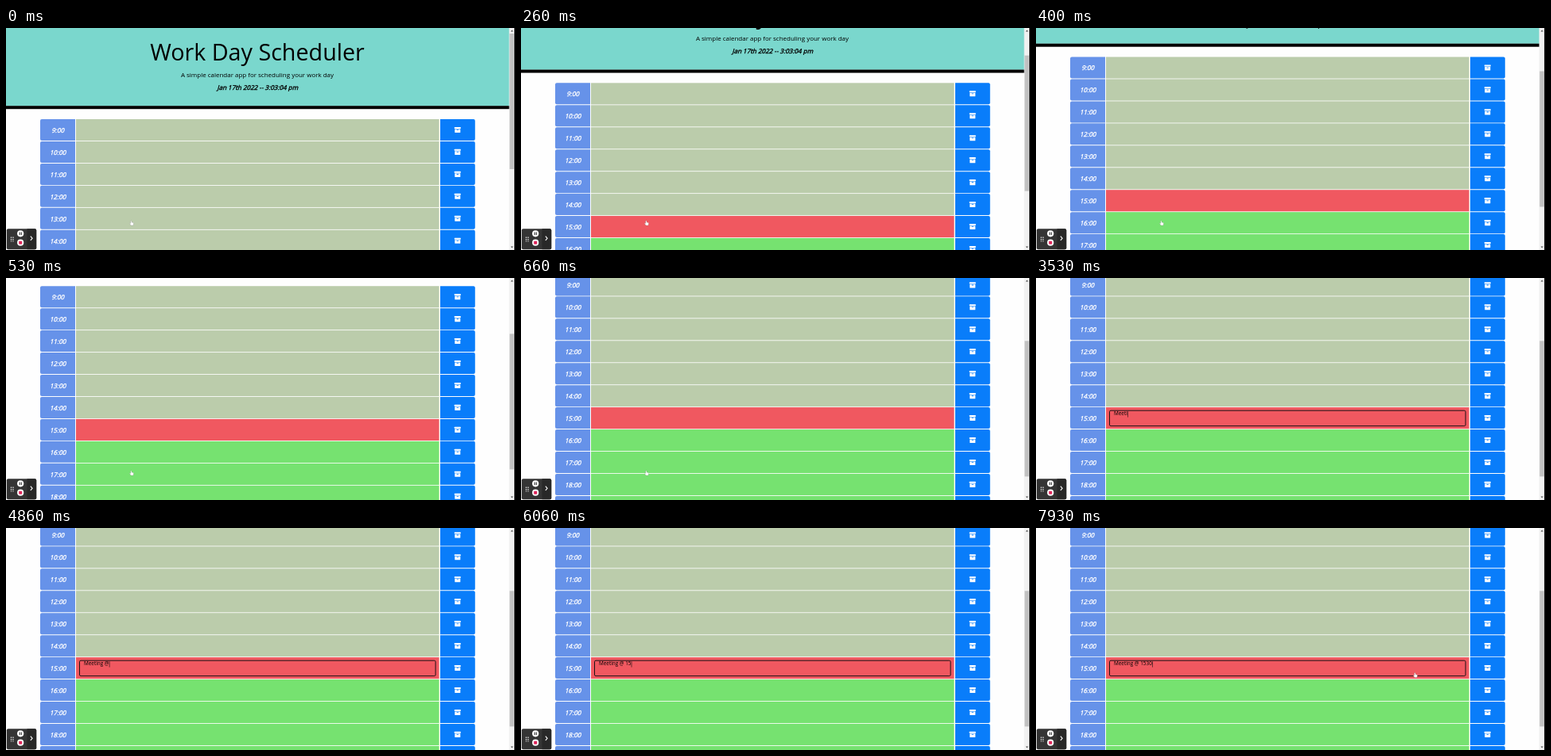
An HTML page for the animation above (8 s loop, 640 px wide and 280 px high).

```html
<!DOCTYPE html>
<html lang="en">
<head>
<meta charset="utf-8">
<title>Work Day Scheduler</title>
<style>
html, body { margin: 0; width: 100%; height: 100%; overflow: hidden; background: #fff; }
svg { display: block; width: 100vw; height: 100vh; font-family: "Open Sans", sans-serif; }
text { white-space: pre; }
.mid { text-anchor: middle; }
.slant { font-size: 8px; text-anchor: middle; stroke-width: .35px; }
</style>
</head>
<body>
<svg viewBox="0 0 640 280">
  <defs>
    <g id="archive" fill="#fff">
      <rect x="-4" y="-3.6" width="8" height="2" rx=".4"/>
      <path d="M-3.5-1.1h7v4.1q0 .5-.5.5h-6q-.5 0-.5-.5zM-1.2-.3v.8h2.4v-.8z" fill-rule="evenodd"/>
    </g>
  </defs>
  <rect width="640" height="280" fill="#fefefe"/>
  <g id="page">
    <rect width="633" height="98.3" fill="#7ad7cd"/>
    <rect y="98.2" width="633" height="4" fill="#000"/>
    <text class="mid" x="316" y="41" font-size="28.7">Work Day Scheduler</text>
    <text class="mid" x="316" y="61.6" font-size="7.97">A simple calendar app for scheduling your work day</text>
    <text class="slant" transform="translate(316.3 77.8) skewX(-14)" stroke="#000">Jan 17th 2022 -- 3:03:04 pm</text>
    <g id="rows"></g>
    <g id="field">
      <rect x="92.5" y="286.8" width="447.6" height="19.4" rx="1.5" fill="none" stroke="#1c1214"/>
      <text id="entry" x="98" y="292.9" font-size="6.38"></text>
      <rect id="caret" y="287.8" width=".6" height="7.4" fill="#111"/>
    </g>
  </g>
  <rect x="632.6" width="7.4" height="280" fill="#f1f1f1"/>
  <path d="M634.6 4.4l1.6-2 1.6 2zM634.6 275.6l1.6 2 1.6-2z" fill="#505050"/>
  <rect id="thumb" x="633.3" width="5.4" height="171" fill="#c1c1c1"/>
  <rect x="639" width="1" height="280" fill="#222"/>

  <g id="recorder">
    <rect x=".8" y="253.2" width="37.4" height="26" rx="2" fill="#343434"/>
    <path d="M26.5 253.2h9.7q2 0 2 2v22q0 2-2 2h-9.7z" fill="#282828"/>
    <path d="M6.5 263.6v6M9 263.6v6" stroke="#ddd" stroke-width="1.3" stroke-dasharray="1.3 1.2"/>
    <circle cx="18.2" cy="259.3" r="4.1" fill="#fff"/>
    <path d="M17.2 257.5v3.6M19.3 257.5v3.6" stroke="#222"/>
    <circle cx="18.2" cy="270.7" r="4.1" fill="#fff"/>
    <rect x="16.2" y="268.7" width="4" height="4" rx=".8" fill="#e0245a"/>
    <path d="M30.8 262.7l2.3 2.6-2.3 2.6" fill="none" stroke="#fff" stroke-width="1.1"/>
  </g>

  <path id="hand" d="M-1.2-2.6q.7-.8 1.2 0v1.7l1.9.5q.7.2.6 1l-.5 2.3h-2.9l-1.7-2.4q.3-.8 1.4-.1z"
        fill="#fff" stroke="#777" stroke-width=".25"/>
</svg>
<script>
const LOOP = 8000, FRAME = 1000 / 15;
const ROW_TOP = 115, PITCH = 27.95;
const $ = id => document.getElementById(id);

const shade = hour => hour < 15 ? '#bbccab' : hour === 15 ? '#f05860' : '#76e270';

function row(hour) {
  const y = ROW_TOP + PITCH * (hour - 9);
  return `<g transform="translate(0 ${y})">
    <path d="M45 0h42v27H45q-2 0-2-2V2q0-2 2-2z" fill="#6692e9"/>
    <rect x="88" width="456.6" height="27.1" fill="${shade(hour)}"/>
    <path d="M546 0h41.8q2 0 2 2v23q0 2-2 2H546z" fill="#097dfa"/>
    <text class="slant" transform="translate(65.2 16.9) skewX(-14)" fill="#fff" stroke="#fff">${hour}:00</text>
    <use href="#archive" x="567.8" y="13.5"/>
  </g>`;
}
$('rows').innerHTML = Array.from({ length: 11 }, (_, i) => row(9 + i)).join('');

// Keys are [time, ...values], joined by straight segments.
function tween(keys, t) {
  if (t <= keys[0][0]) return keys[0].slice(1);
  for (let i = 1; i < keys.length; i++) {
    const a = keys[i - 1], b = keys[i];
    if (t < b[0]) {
      const p = (t - a[0]) / (b[0] - a[0]);
      return a.slice(1).map((v, n) => v + (b[n + 1] - v) * p);
    }
  }
  return keys[keys.length - 1].slice(1);
}

const SCROLL = [[0, 0], [130, 12], [400, 78.5], [580, 114], [660, 119.6]];
const POINTER = [
  [700, 158, 246], [950, 159, 222], [1260, 164, 187],
  [6800, 164, 187], [7060, 196, 190], [7470, 196, 190], [7930, 477, 185.5]
];
const MESSAGE = 'Meeting @ 1530';
const KEY_TIMES = [2460, 2660, 2930, 3130, 3530, 3660, 3800, 3930, 4860, 5730, 6000, 6060, 6460, 6660];
const FOCUS = 1460, BLINK = 500;

function draw(now) {
  const t = now % LOOP;
  const tick = Math.floor((t + 7) / FRAME) * FRAME;

  const [scroll] = tween(SCROLL, tick);
  $('page').setAttribute('transform', `translate(0 ${-scroll})`);
  $('thumb').setAttribute('y', 7 + scroll * .605);

  const count = KEY_TIMES.filter(k => k <= t).length;
  const lastKey = count ? KEY_TIMES[count - 1] : FOCUS;
  const entry = $('entry');
  entry.textContent = MESSAGE.slice(0, count);
  $('field').style.display = t < FOCUS ? 'none' : '';
  const caretOn = Math.floor((tick - lastKey) / BLINK) % 2 === 0;
  $('caret').style.display = caretOn ? '' : 'none';
  $('caret').setAttribute('x', 98.2 + (count ? entry.getComputedTextLength() : 0));

  const [x, y] = tween(POINTER, tick);
  $('hand').setAttribute('transform', `translate(${x} ${y})`);
  $('hand').style.display = t >= KEY_TIMES[0] && t < 6860 ? 'none' : '';
}

const start = performance.now();
function loop() {
  draw(performance.now() - start);
  requestAnimationFrame(loop);
}
loop();
</script>
</body>
</html>
```
